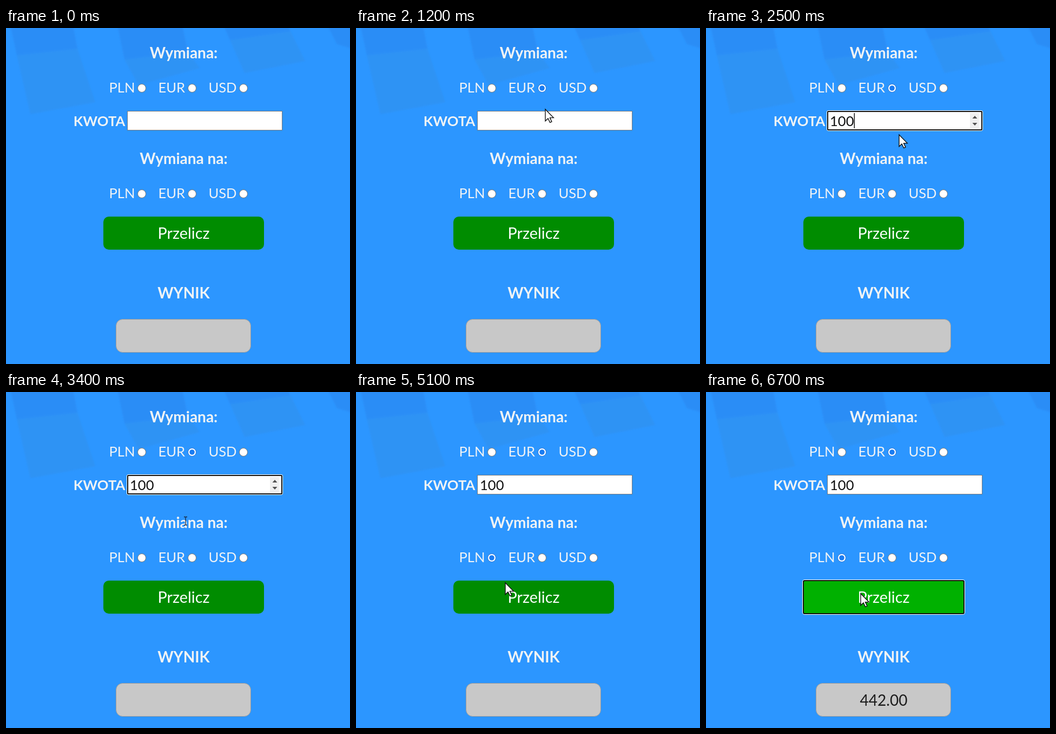
An HTML page that plays this animation: 636 px wide and 620 px high, repeating every 7100 ms.

```html
<!DOCTYPE html>
<html lang="pl">
<head>
<meta charset="utf-8">
<title>Wymiana</title>
<style>
  html, body { margin: 0; width: 100%; height: 100%; overflow: hidden; background: #2c96ff; }
  svg { display: block; width: 636px; height: 620px; }
  text { font-family: Lato, sans-serif; font-size: 25.6px; fill: #f1f3f5; text-anchor: middle; }
  .head { font-size: 28px; font-weight: 700; }
  .bold { font-weight: 700; }
  .button { font-size: 28.8px; fill: #fff; }
  .result { font-size: 28px; fill: #1c1c1c; }
  #amount { fill: #111; text-anchor: start; }
</style>
</head>
<body>
<svg viewBox="0 0 636 620">
  <defs><filter id="soft"><feGaussianBlur stdDeviation="1.6"/></filter></defs>
  <rect width="636" height="620" fill="#2c96ff"/>
  <g filter="url(#soft)">
    <path fill="#2f93f4" d="M20 50L132 38L165 137L45 159ZM219 58L336 44L358 74L245 105ZM414 22L526 6L553 61L441 83Z"/>
    <path fill="#2b8df6" d="M8-5H124L132 38L20 50ZM206-5H326L336 44L219 58ZM402-5H520L526 6L414 22ZM594-5H640V38L612 30Z"/>
  </g>

  <text class="head" x="328.5" y="56">Wymiana:</text>
  <text class="bold" x="172.5" y="181">KWOTA</text>
  <text class="head" x="328.5" y="251">Wymiana na:</text>
  <text class="head" x="328.5" y="499">WYNIK</text>
  <g id="radios"></g>

  <rect x="224.5" y="153.5" width="286" height="35" fill="#fff" stroke="#767676"/>
  <g id="inputRing" fill="none">
    <rect x="223.5" y="152.5" width="288" height="37" rx="2.5" stroke="#fff"/>
    <rect x="225" y="154" width="285" height="34" rx="1.5" stroke="#101010" stroke-width="2"/>
  </g>
  <g id="spinner">
    <rect x="488" y="157" width="17" height="28" fill="#efefef"/>
    <path fill="#505050" d="M492.5 167L497 162L501.500 167ZM492.500 175L497 180L501.500 175Z"/>
  </g>
  <text id="amount" x="229" y="181"></text>
  <rect id="caret" y="157" width="1.5" height="28" fill="#111"/>

  <rect id="button" x="180" y="348" width="297" height="61"/>
  <g id="buttonRing" fill="none">
    <rect x="178.500" y="346.500" width="300" height="64" rx="3.500" stroke="#fff"/>
    <rect x="180" y="348" width="297" height="61" rx="2.500" stroke="#101010" stroke-width="2"/>
  </g>
  <text class="button" x="328.5" y="389">Przelicz</text>

  <rect x="203.5" y="537.5" width="249" height="61" rx="12" fill="#c8c8c8" stroke="#9a9a9a"/>
  <text class="result" id="result" x="328.5" y="579">442.00</text>

  <path id="arrow" d="M0 0V17L4 13.300L6.800 19.200L9.400 18L6.700 12.300H12Z" fill="#fff" stroke="#111" stroke-width="1.1"/>
  <path id="beam" d="M-3-7.500H-1L0-7L1-7.500H3M0-7V7M-3 7.500H-1L0 7L1 7.500H3" fill="none" stroke="#16243a" stroke-width="1.3"/>
</svg>
<script>
const LOOP = 7100, STEP = 100;
const FOCUS = 1800, BLUR = 4300, HOVER = 5100, RESULT = 5600, RING = 6100;
const KEYS = [2000, 2300, 2500];
const CHECKED = { EUR0: 700, PLN1: 4500 };

// Pointer: time, x, y
const PATH = [
  [100, 430, 250], [300, 368, 150], [500, 336, 106], [700, 337, 106],
  [900, 337, 108], [1200, 350, 150], [1500, 360, 176], [1800, 359, 190],
  [2600, 357, 198], [3000, 354, 204], [3400, 332, 238], [3700, 264, 292],
  [3900, 256, 300], [4300, 249, 304], [4500, 249, 304], [4800, 260, 325],
  [5100, 276, 352], [5400, 286, 372], [LOOP, 286, 372]
];

const $ = id => document.getElementById(id);
const show = (id, on) => $(id).setAttribute('visibility', on ? 'visible' : 'hidden');
const set = (id, attrs) => {
  for (const name in attrs) $(id).setAttribute(name, attrs[name]);
};

const columns = [['PLN', 214.5, 251], ['EUR', 306.2, 344], ['USD', 400.5, 439]];
$('radios').innerHTML = [119, 314].map((y, row) => columns.map(([name, x, cx]) => {
  const at = `cx="${cx}" cy="${y - 8}"`;
  return `<text x="${x}" y="${y}">${name}</text>
    <circle ${at} r="7.5" fill="#fff" stroke="#767676"/>
    <g id="${name + row}"><circle ${at} r="7.5" fill="#fff" stroke="#1a78ee"/>
    <circle ${at} r="4.8" fill="#1a7cf2"/></g>`;
}).join('')).join('');
columns.forEach(([name]) => [0, 1].forEach(row => show(name + row, false)));

function pointer(t) {
  const i = Math.max(1, PATH.findIndex(p => p[0] > t));
  const [a, b] = [PATH[i - 1], PATH[i]];
  const k = (t - a[0]) / (b[0] - a[0]);
  return [a[1] + (b[1] - a[1]) * k, a[2] + (b[2] - a[2]) * k].map(Math.round);
}

function draw(t) {
  const [x, y] = pointer(t);
  const overInput = x > 224 && x < 511 && y > 153 && y < 191;
  const overHeading = x > 248 && x < 409 && y > 226 && y < 258;
  const isBeam = t > 500 && (overInput || overHeading);
  const place = `translate(${x} ${y})`;
  set('arrow', { transform: place + ' scale(1.27)' });
  set('beam', { transform: place });
  show('arrow', t >= 100 && !isBeam);
  show('beam', isBeam);

  for (const id in CHECKED) show(id, t >= CHECKED[id]);

  const focused = t >= FOCUS && t < BLUR;
  const typed = KEYS.filter(k => t >= k).length;
  const lastEdit = typed ? KEYS[typed - 1] : FOCUS;
  $('amount').textContent = '100'.slice(0, typed);
  show('inputRing', focused);
  show('spinner', focused || (t > 500 && overInput));
  show('caret', focused && (t - lastEdit) % 1000 < 500);
  set('caret', { x: 229 + typed * 14.85 });

  const lit = Math.min(1, Math.max(0, (t - HOVER) / 400));
  set('button', { fill: `rgb(0 ${Math.round(140 + 37 * lit)} 0)`, rx: t >= RING ? 3 : 10 });
  show('buttonRing', t >= RING);
  show('result', t >= RESULT);
}

const start = performance.now();
function tick() {
  const t = (performance.now() - start) % LOOP;
  draw(Math.floor(t / STEP) * STEP);
  requestAnimationFrame(tick);
}
tick();
</script>
</body>
</html>
```
